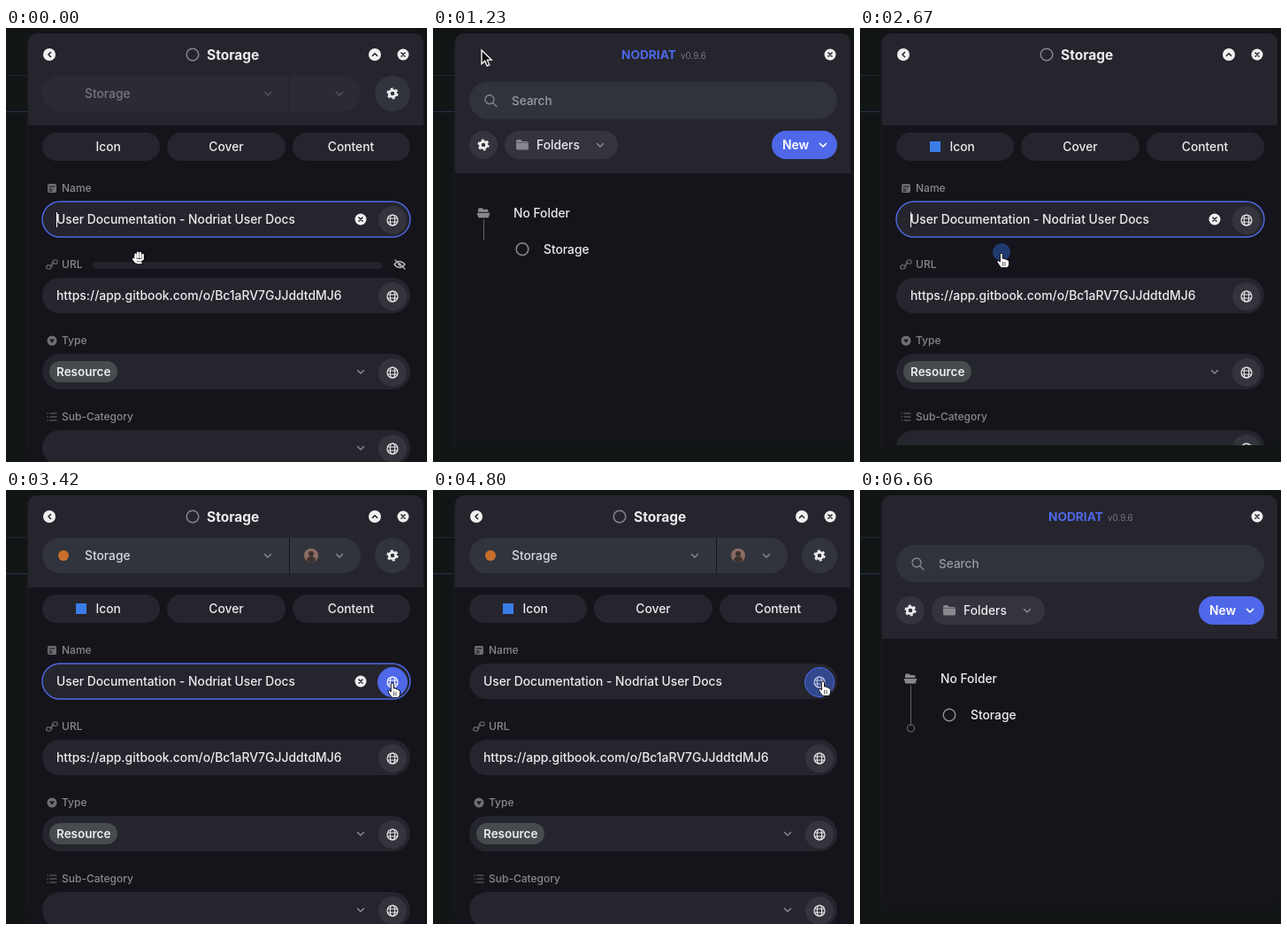
These frames come from a looping animation (476 px wide and 490 px high, 7.17 s). An HTML page:

```html
<!DOCTYPE html>
<html lang="en">
<head>
<meta charset="utf-8">
<title>Storage panel</title>
<style>
html, body { margin: 0; width: 100%; height: 100%; overflow: hidden; background: #121516; }
svg { display: block; width: 476px; height: 490px; font-family: Inter, "Open Sans", sans-serif; }
text { white-space: pre; }
</style>
</head>
<body>
<svg id="stage" viewBox="0 0 476 490"></svg>
<script>
const stage = document.getElementById('stage');
const LOOP = 7170, STEP = 30, LAST = 6660;
const BODY = '#15141b', HEAD = '#26252d', FIELD = '#25252d', PILL = '#31333c',
      WHITE = '#ececee', GREY = '#88888e', DIM = '#6e6e74', INK = '#222129', BLUE = '#4e68e9';

// Screen changes and clicks, in ms
const BACK_1 = 940, OPEN_2 = 2600, EXPAND = 3640, COLLAPSE = 4670, BACK_2 = 5670;
const clicks = [[910, 53, 29], [2590, 160, 253], [5640, 55, 32]];
const route = [
  [0, 150, 260], [90, 150, 260], [700, 53, 29], [1000, 53, 29], [1200, 55, 25], [1500, 55, 25],
  [2150, 158, 252], [2600, 160, 254], [2900, 160, 256], [3400, 437, 218], [3700, 434, 218],
  [4110, 431, 219], [4500, 437, 217], [4800, 441, 216], [4860, 441, 216], [5260, 52, 31],
  [5660, 52, 31], [6480, 169, 426], [6660, 186, 492]
];

const clamp = v => Math.max(0, Math.min(1, v));
const ease = v => (v = clamp(v), v * v * (3 - 2 * v));
const ramp = (t, start, length) => ease((t - start) / length);

const rect = (x, y, w, h, r, fill, more = '') =>
  `<rect x="${x}" y="${y}" width="${w}" height="${h}" rx="${r}" fill="${fill}" ${more}/>`;
const circle = (x, y, r, fill, more = '') =>
  `<circle cx="${x}" cy="${y}" r="${r}" fill="${fill}" ${more}/>`;
const ring = (x, y, r, color, w = 1.5) => circle(x, y, r, 'none', `stroke="${color}" stroke-width="${w}"`);
const line = (d, color, w = 1.5) =>
  `<path d="${d}" fill="none" stroke="${color}" stroke-width="${w}" stroke-linecap="round" stroke-linejoin="round"/>`;
const shape = (d, fill) => `<path d="${d}" fill="${fill}"/>`;
const text = (x, y, s, size = 13.8, weight = 500, fill = WHITE, anchor = 'start') =>
  `<text x="${x}" y="${y}" font-size="${size}" font-weight="${weight}" fill="${fill}" text-anchor="${anchor}">${s}</text>`;
const move = (x, y, s) => `<g transform="translate(${x} ${y})">${s}</g>`;
const fade = (a, s) => a > 0 ? `<g opacity="${a}">${s}</g>` : '';
const clip = (id, x, y, w, h, s) =>
  `<clipPath id="${id}">${rect(x, y, w, Math.max(0, h), 0, '#fff')}</clipPath><g clip-path="url(#${id})">${s}</g>`;

const chevron = (x, y, color = GREY, w = 1.5) => line(`M${x - 3.5} ${y - 1.5}l3.5 3.5 3.5-3.5`, color, w);
const globe = (x, y, color = WHITE) => ring(x, y, 6, color, 1.2) +
  `<ellipse cx="${x}" cy="${y}" rx="2.7" ry="6" fill="none" stroke="${color}" stroke-width="1.1"/>` +
  line(`M${x - 5.5} ${y - 2}h11M${x - 5.5} ${y + 2}h11`, color, 1.1);
const gear = (x, y) => ring(x, y, 3.7, WHITE, 2.8) +
  circle(x, y, 5.6, 'none', `stroke="${WHITE}" stroke-width="2" stroke-dasharray="2.93 2.93"`);
const disc = (x, mark) => circle(x, 30, 7, '#f0f0f0') + line(mark, INK, 1.6);
const closeDisc = (x, y) => circle(x, y, 6.5, '#f0f0f0') + line(`M${x - 2} ${y - 2}l4 4m0-4l-4 4`, INK, 1.6);
const globeButton = y => circle(437, y, 16, '#33343c') + globe(437, y);

const labelIcons = {
  Name: rect(-5, -5, 10, 10, 2, DIM) + line('M-3-2H3M-3 1H0M-3 3H0', BODY, 1.2),
  URL: line('M-1 1l-2 0a2 2 0 0 0-2 4h3l2-3M1-1l2 0a2 2 0 0 0 2-4h-3l-2 3M-2 2l4-4', DIM, 1.2),
  Type: circle(0, 0, 5.5, DIM) + shape('M-3-1.5h6l-3 4z', BODY),
  'Sub-Category': line('M-5-4h.5M-5 0h.5M-5 4h.5M-2-4H5M-2 0H5M-2 4H5', DIM, 1.2)
};
const label = (y, name) => move(52, y, labelIcons[name]) + text(63, y + 4.3, name, 12, 500, GREY);

function cursorAt(t) {
  const i = Math.max(1, route.findIndex(p => p[0] >= t));
  const [t0, x0, y0] = route[i - 1], [t1, x1, y1] = route[i];
  const k = ramp(t, t0, t1 - t0);
  return [x0 + (x1 - x0) * k, y0 + (y1 - y0) * k];
}

const fingers = 'M-3.6 1V-4.2M-1-1V-6.3M1.8-1V-6M4.6 1V-4M-6 1l3 3.5M-2 2h5M-1 5h3.5';
const pointers = {
  arrow: `<path d="M0 0v15.5l3.7-3.3 2.5 5.6 2.6-1.2-2.5-5.4h5z" fill="#08080b" stroke="#fff" stroke-width="1.3"/>`,
  hand: `<path d="M-1.7 1.5a1.6 1.6 0 0 1 3.2 0V6q2-.8 2.6.8q2-.5 2.5 1q2-.2 2 1.7v2.5q0 2.5-2.2 4.4h-6.6q-2.5-2.4-4.6-6.2q-.8-2 1-2.2l2.1 1.8z" fill="#fff" stroke="#08080b"/>` +
    line('M1.6 10v4M4 10v4', '#222', .8),
  grab: line(fingers, '#08080b', 4.6) + line(fingers, '#fff', 2.4)
};

function backdrop() {
  return rect(0, 0, 476, 490, 0, '#121516') + rect(0, 53, 25, 1, 0, '#20282b') +
    rect(0, 94, 25, 1, 0, '#24354a') + rect(23.5, 14, 1, 460, 0, '#1b1d20');
}

function shell(headBottom, bottom, radius) {
  return rect(25, 6, 447, bottom - 6, radius, BODY) +
    shape(`M25 ${headBottom}V18q0-12 12-12H460q12 0 12 12V${headBottom}z`, HEAD);
}

// since: time on this screen
function mainScreen(since) {
  const q = 1 - ramp(since, 90, 400);
  const stem = 22 + 2 * ramp(since, 90, 200) + 22 * ramp(since, 300, 300);
  const header = text(213, 35, 'NODRIAT', 13.7, 700, BLUE) +
    text(280, 35, 'v0.9.6', 9.8, 400, '#77777e') + closeDisc(449, 30);
  const search = rect(41, 62, 416, 42, 21, PILL) + ring(64, 82, 5, GREY, 1.3) +
    line('M68 86l4 4', GREY, 1.3) + text(89, 88, 'Search', 13.6, 500, '#9a9aa1');
  const folder = shape('M-7-4q0-2 2-2h3l2 2h5q2 0 2 2v6q0 1.5-1.5 1.5h-11q-1.5 0-1.5-1.5z', GREY) +
    line('M-7-2.5H7', '#55555c', .8);
  const tools = circle(57, 136, 16, '#33343d') + gear(57, 136) + rect(81, 120, 128, 32, 16, '#33343d') +
    move(101, 136, folder) + text(117, 141, 'Folders') + chevron(189, 136) +
    rect(383, 120, 74, 32, 16, BLUE) + text(395, 141, 'New', 13.8, 600, '#fff') + chevron(441, 136, '#fff', 1.7);
  const openFolder = shape('M-6-1v-3q0-1.5 1.5-1.5h3l1.5 1.5h4q1.5 0 1.5 1.5v1.5zM-7.5 0h15l-2 5.5h-11z', GREY);
  const list = move(57, 213, openFolder) + text(91, 218, 'No Folder') +
    line(`M57.5 221V${219 + stem}`, '#626268', 1) +
    fade(ramp(since, 560, 120), ring(57.5, 269, 4, '#6a6a70', 1.2)) +
    ring(101, 254, 6.8, '#8b8b91') + text(125, 259, 'Storage');
  return shell(168 - 8 * q, 472 - 8 * q, 10) + header + move(0, -2.5 * q, search) +
    move(0, -8 * q, tools) + move(0, -8.7 * q, list);
}

function dataPanel() {
  const floppy = shape('M-5.5-5.5h8.5l2.5 2.5v8.5h-11z', WHITE) +
    rect(-3, -4, 5, 3, 0, '#34353e') + circle(0, 2.3, 1.7, '#34353e');
  const eye = shape('M-7.5 0q7.5-11 15 0q-7.5 11-15 0z', WHITE) + circle(0, 0, 3, '#34353e') + circle(0, 0, 1.6, WHITE);
  return rect(41, 244, 416, 150, 12, '#27272e') + rect(49, 252, 196, 32, 16, '#34353e') +
    globe(69, 268, GREY) + text(85, 273, 'Basic Data') + chevron(225, 268) +
    rect(349, 252, 60, 32, 16, '#34353e') + move(369, 268, floppy) +
    chevron(393, 268, WHITE, 1.7) + circle(433, 268, 16, '#34353e') + move(433, 268, eye) +
    text(57, 327, 'TITLE', 11.6, 500, GREY) + rect(49, 338, 400, 40, 6, '#33353d') +
    text(65, 363, 'User Documentation - Nodriat User Docs') +
    rect(396, 328, 45, 20, 10, '#4b67e3') + text(418.5, 342, 'Saved', 10.3, 600, '#fff', 'middle');
}

function nameButton(t, hovered) {
  if (!hovered) return globeButton(217);
  const pressed = [EXPAND, COLLAPSE].some(at => t >= at && t < at + 230);
  return circle(437, 217, 16.5, pressed ? '#32488e' : BLUE, `stroke="${BLUE}"`) + globe(437, 217, pressed ? '#c3cae6' : '#fff');
}

function detailScreen(t, since, x, y) {
  const focused = t < EXPAND;
  const open = ramp(t, EXPAND, 220) * (1 - ramp(t, COLLAPSE, 120));
  const drop = 158 * open;
  const iconReady = t > 150;
  const hovered = Math.hypot(x - 437, y - 217) < 18;
  const rowHover = since > 150 && !open && Math.abs(y - 262) < 18 && x < 457;
  const bottom = 471 + 40 * ramp(since, 120, 180);

  const header = disc(49, 'M50.5 27.5l-2.5 2.5 2.5 2.5') + ring(211, 30, 6.8, '#85858b') +
    text(227, 36, 'Storage', 15.5, 700) + disc(417, 'M414.5 31.3l2.5-2.5 2.5 2.5') + closeDisc(449, 30);
  const shown = clamp((since - 230) / 220);
  const avatar = circle(345, 74, 8, '#8b6c62') + circle(345, 72, 3, '#3e3230') + shape('M340 80q0-5 5-5t5 5q-5 4-10 0z', '#3e3230');
  const selects = rect(41, 54, 360, 40, 20, '#31343d') + rect(320, 54, 1, 40, 0, BODY) +
    text(89, 79, 'Storage', 13.8, 500, '#d9d9dc') + chevron(296, 74) + chevron(377, 74) +
    (since > 480 ? circle(65, 74, 6, '#c8702b') + avatar : '');
  const tabs = rect(41, 118, 133, 32, 16, FIELD) + rect(182, 118, 134, 32, 16, FIELD) + rect(324, 118, 133, 32, 16, FIELD) +
    (iconReady ? rect(79, 128, 12, 12, 0, '#3b7de8') : '') + text(101.5, 139, 'Icon') +
    text(249, 139, 'Cover', 13.8, 500, WHITE, 'middle') + text(390, 139, 'Content', 13.8, 500, WHITE, 'middle');
  const name = label(181, 'Name') +
    rect(41, 196, 416, 40, 20, FIELD, focused ? 'stroke="#5069e6" stroke-width="1.4"' : '') +
    text(57, 221, 'User Documentation - Nodriat User Docs') +
    (focused ? closeDisc(401, 216) : '') +
    (focused && since % 1000 < 530 ? rect(57, 208, 1, 17, 0, '#fff') : '') +
    nameButton(t, hovered);
  const loader = rect(98, 264, 327, 8, 4, '#23232b') +
    line('M439 267q6-7 12 0q-6 7-12 0M440 262l11 10', '#b5b5ba', 1.3) + circle(445, 267, 1.8, '#b5b5ba');
  const rest = label(267, 'URL') + (rowHover ? loader : '') + rect(41, 282, 416, 40, 20, FIELD) +
    text(57, 307, 'https://app.gitbook.com/o/Bc1aRV7GJJddtdMJ6', 13.9) + globeButton(303) +
    label(353, 'Type') + rect(41, 368, 416, 40, 20, FIELD) + rect(49, 376, 77, 24, 12, '#474b4d') +
    text(57, 393, 'Resource', 13.5, 600) + chevron(401, 388) + globeButton(389) +
    label(439, 'Sub-Category') + rect(41, 454, 416, 40, 20, FIELD) + chevron(401, 474) + globeButton(475);

  return clip('panel', 25, 0, 447, bottom,
    shell(110, bottom, 2) + header + fade(shown, selects) +
    (shown ? circle(437, 74, 20, '#31343d') + gear(437, 74) : '') + tabs + name +
    (open ? clip('drawer', 41, 240, 416, drop - 4, dataPanel()) : '') + move(0, drop, rest));
}

function pointerKind(onMain, since, x, y) {
  if (onMain) return x > 91 && Math.abs(y - 254) < 16 && since > 1000 ? 'hand' : 'arrow';
  if (since < 120) return 'hand';
  if (Math.abs(y - 262) < 16) return 'grab';
  const over = (bx, by, r) => Math.hypot(x - bx, y - by) < r;
  return over(49, 30, 12) || over(437, 217, 19) ? 'hand' : 'arrow';
}

function ripples(t) {
  return clicks.map(([at, x, y]) => {
    const age = t - at;
    if (age < 0 || age > 230) return '';
    return circle(x, y, Math.min(14.5, 1 + age * .1125), '#20427f', `opacity="${.85 * (1 - ramp(age, 140, 90))}"`);
  }).join('');
}

function draw(now) {
  const t = Math.min(LAST, Math.floor(now % LOOP / STEP) * STEP);
  const onMain = t >= BACK_1 && t < OPEN_2 || t >= BACK_2;
  const since = t >= BACK_2 ? t - BACK_2 : t >= OPEN_2 ? t - OPEN_2 : t >= BACK_1 ? t - BACK_1 : t + 330;
  const [x, y] = cursorAt(t);
  stage.innerHTML = backdrop() + (onMain ? mainScreen(since) : detailScreen(t, since, x, y)) +
    ripples(t) + move(x, y, pointers[pointerKind(onMain, since, x, y)]);
}

const begin = performance.now();
function tick() {
  draw(performance.now() - begin);
  requestAnimationFrame(tick);
}
draw(0);
requestAnimationFrame(tick);
</script>
</body>
</html>
```
